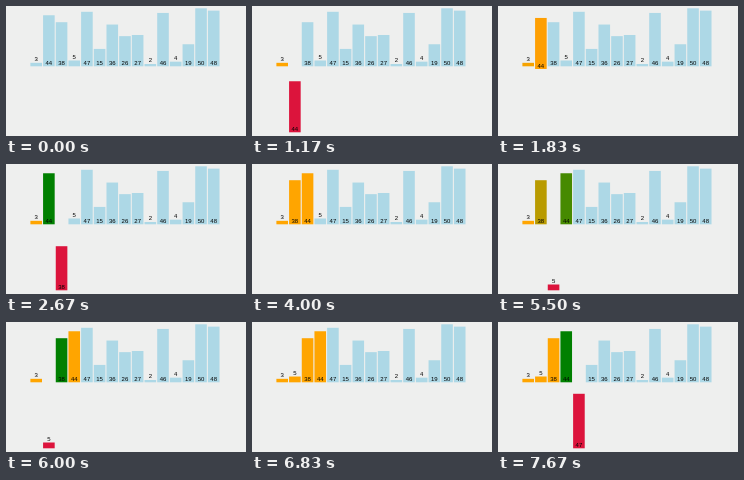
These frames come from a looping animation (240 px wide and 130 px high, 8 s). An HTML page:

```html
<!DOCTYPE html>
<html lang="en">
<head>
<meta charset="utf-8">
<title>Insertion sort</title>
<style>
  html, body { margin: 0; width: 100%; height: 100%; overflow: hidden; background: #eeefee; }
  svg { display: block; width: 240px; height: 130px; }
  text { font: 6px "Liberation Sans", Arial, sans-serif; text-anchor: middle; fill: #000; }
</style>
</head>
<body>
<svg id="stage" viewBox="0 0 240 130"></svg>
<script>
const VALUES = [3, 44, 38, 5, 47, 15, 36, 26, 27, 2, 46, 4, 19, 50, 48];
const BLUE = [173, 216, 230], ORANGE = [255, 165, 0], GREEN = [0, 128, 0], RED = [220, 20, 60];
const LEFT = 24.4, PITCH = 12.68, WIDTH = 11.6, BASE = 60.3, DROP = 66, UNIT = 1.16;
const LOOP = 8000, TICK = 1000 / 6;

// Pace of the sort: [tick, step reached]
const PACE = [
  [0, 0], [1, .3], [5, 1.9], [6, 1.9], [7, 2.05], [16, 5.95], [21, 8], [22, 8],
  [24, 9], [33, 12.41], [36, 14], [37, 14], [41, 15.95], [46, 18], [48, 18]
];

// Run the sort on the first five bars and keep a snapshot after each step.
function record() {
  const bars = VALUES.map((v, i) => ({ slot: i, down: 0, color: BLUE }));
  const order = bars.map((b, i) => i);
  const steps = [];
  const save = () => steps.push(bars.map(b => ({ ...b })));
  save();
  bars[0].color = ORANGE;
  save();
  for (let i = 1; i < 5; i++) {
    const key = order[i];
    Object.assign(bars[key], { down: 1, color: RED });
    save();
    let j = i - 1;
    for (; j >= 0; j--) {
      const other = order[j];
      bars[other].color = GREEN;
      save();
      if (VALUES[other] <= VALUES[key]) {
        bars[other].color = ORANGE;
        break;
      }
      bars[other].slot = j + 1;
      bars[key].slot = j;
      order[j + 1] = other;
      order[j] = key;
      save();
      bars[other].color = ORANGE;
    }
    Object.assign(bars[key], { down: 0, color: ORANGE });
    save();
  }
  return steps;
}

const steps = record();
const stage = document.getElementById("stage");

function add(parent, tag, attrs) {
  const el = document.createElementNS("http://www.w3.org/2000/svg", tag);
  for (const k in attrs) el.setAttribute(k, attrs[k]);
  return parent.appendChild(el);
}

const views = VALUES.map(v => {
  const g = add(stage, "g");
  const h = v * UNIT;
  const rect = add(g, "rect", { x: 0, y: -h, width: WIDTH, height: h });
  const label = add(g, "text", { x: WIDTH / 2, y: h < 10 ? -h - 1.7 : -1.2 });
  label.textContent = v;
  return { g, rect };
});

const mix = (a, b, t) => a + (b - a) * t;
const ease = t => t < .5 ? 4 * t ** 3 : 1 - 4 * (1 - t) ** 3;

function pace(tick) {
  const i = PACE.findIndex(p => p[0] > tick);
  const [t0, s0] = PACE[i - 1], [t1, s1] = PACE[i];
  return mix(s0, s1, (tick - t0) / (t1 - t0));
}

function draw(now) {
  const at = pace(Math.floor((now % LOOP) / TICK + .02) % 48);
  const n = Math.floor(at), t = ease(at - n);
  const from = steps[n], to = steps[n + 1] || from;
  views.forEach((view, i) => {
    const a = from[i], b = to[i];
    const x = LEFT + PITCH * mix(a.slot, b.slot, t);
    const y = BASE + DROP * mix(a.down, b.down, t);
    const rgb = a.color.map((c, k) => Math.round(mix(c, b.color[k], t)));
    view.g.setAttribute("transform", `translate(${x} ${y})`);
    view.rect.setAttribute("fill", `rgb(${rgb})`);
  });
}

const start = performance.now();
function frame() {
  draw(performance.now() - start);
  requestAnimationFrame(frame);
}
frame();
</script>
</body>
</html>
```
